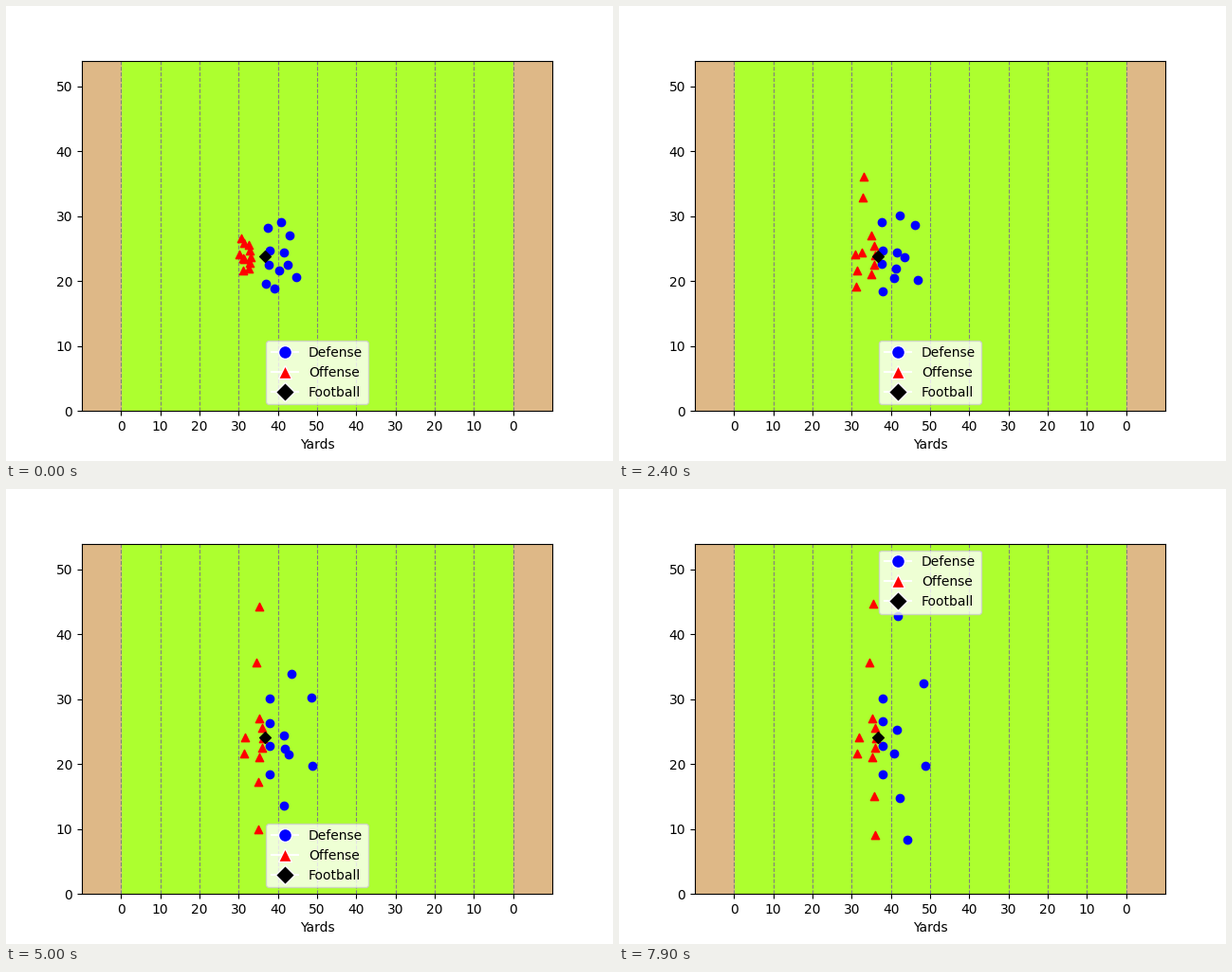
A matplotlib script for the animation above (8000 ms loop, 640 by 480 pixels).

```python
import matplotlib.pyplot as plt
import numpy as np
from matplotlib.animation import FuncAnimation
from matplotlib.lines import Line2D

FRAMES, STEP = 80, 100
LENGTH, WIDTH = 120, 54
T = np.arange(FRAMES) * STEP / 1000


def route(*points):
    """Smooth run through (seconds, x, y) points, standing still outside them."""
    keys, *axes = np.array(points, float).T
    t = np.clip(T, keys[0], keys[-1])
    h = np.diff(keys)
    k = np.clip(np.searchsorted(keys, t, side="right") - 1, 0, len(h) - 1)
    s = (t - keys[k]) / h[k]
    out = []
    for v in axes:
        d = np.diff(v) / h
        m = np.r_[d[0], [2 * a * b / (a + b) if a * b > 0 else 0
                         for a, b in zip(d, d[1:])], d[-1]]
        out.append(v[k] + s * s * (3 - 2 * s) * (v[k + 1] - v[k])
                   + s * (1 - s) * h[k] * ((1 - s) * m[k] - s * m[k + 1]))
    return np.column_stack(out)


def blocker(i):
    """Lineman i of -2..2: the tight arc widens into a pocket."""
    s = 1 - np.exp(-1.2 * T)
    x = 258 - 0.6 * i * i + s * (13 - 0.4 * i * i)
    y = 264.5 + 6.3 * i + s * (4 * i - 2)
    return np.column_stack([x, y])


defense = [
    # line
    route((0, 276, 234), (5, 278, 221)),
    route((3.5, 278, 258), (5.2, 278, 245)),
    route((0, 277, 273), (6, 278, 271)),
    route((0, 274, 293), (1.5, 278, 301)),
    # linebackers
    route((5, 293, 260), (7.9, 290, 279)),
    route((0, 288, 279), (4.7, 294, 275), (7.9, 293, 254)),
    route((1, 297, 273), (2.4, 301, 265), (5, 301, 195), (7.9, 294, 134)),
    # backs
    route((0, 290, 228), (2.4, 296, 221), (5, 298, 280), (7.9, 296, 326)),
    route((0.7, 283, 298), (2.4, 290, 287), (5, 293, 334), (7.9, 304, 370)),
    route((0, 299, 242), (5.6, 323, 217), (7.9, 321, 205)),
    route((0, 306, 286), (4.8, 323, 292)),
]
offense = [
    # receivers
    route((0.3, 251, 250), (3.5, 262, 150), (5.2, 268, 121)),
    route((0, 248, 245), (2.4, 257, 202), (5, 264, 183)),
    route((0, 250, 266), (1.7, 254, 255), (5, 266, 309), (7.9, 269, 324)),
    route((0.5, 250, 279), (2.4, 250, 296), (5, 266, 359), (6, 270, 365)),
    # backfield
    route((0, 246, 262), (6, 253, 262)),
    route((1, 251, 267), (2.2, 251, 279)),
] + [blocker(i) for i in range(-2, 3)]
ball = [route((2, 273, 264), (5, 273, 262))]


def to_field(runs):
    """Stage pixels to yards, as an array of (frame, player, xy)."""
    px = np.stack(runs, axis=1)
    return (px - (80, 427.2)) * (LENGTH / 496, -WIDTH / 369.6)


fig, ax = plt.subplots(figsize=(6.4, 4.8), dpi=100)
ax.set(xlim=(0, LENGTH), ylim=(0, WIDTH), facecolor="greenyellow", xlabel="Yards")
for left in (0, LENGTH - 10):
    ax.axvspan(left, left + 10, color="burlywood")
yard_lines = range(10, 111, 10)
ax.set_xticks(yard_lines, [str(50 - abs(x - 60)) for x in yard_lines])
for x in yard_lines:
    ax.axvline(x, color="gray", ls="--", lw=0.8)

teams, handles = [], []
for label, color, marker, runs in (
    ("Defense", "blue", "o", defense),
    ("Offense", "red", "^", offense),
    ("Football", "black", "D", ball),
):
    path = to_field(runs)
    dots = ax.scatter(path[0, :, 0], path[0, :, 1], c=color, marker=marker, zorder=3)
    teams.append((dots, path))
    handles.append(Line2D([], [], color="w", marker=marker, markerfacecolor=color,
                          markersize=10, label=label))
legend = ax.legend(handles=handles, loc="lower center")


def update(frame):
    for dots, path in teams:
        dots.set_offsets(path[frame])
    # The key makes room once a defender runs beneath it.
    legend.set_loc("lower center" if T[frame] < 5.9 else "upper center")
    return [dots for dots, _ in teams] + [legend]


anim = FuncAnimation(fig, update, frames=FRAMES, interval=STEP, repeat=True,
                     repeat_delay=0, blit=False)
plt.show()
```
